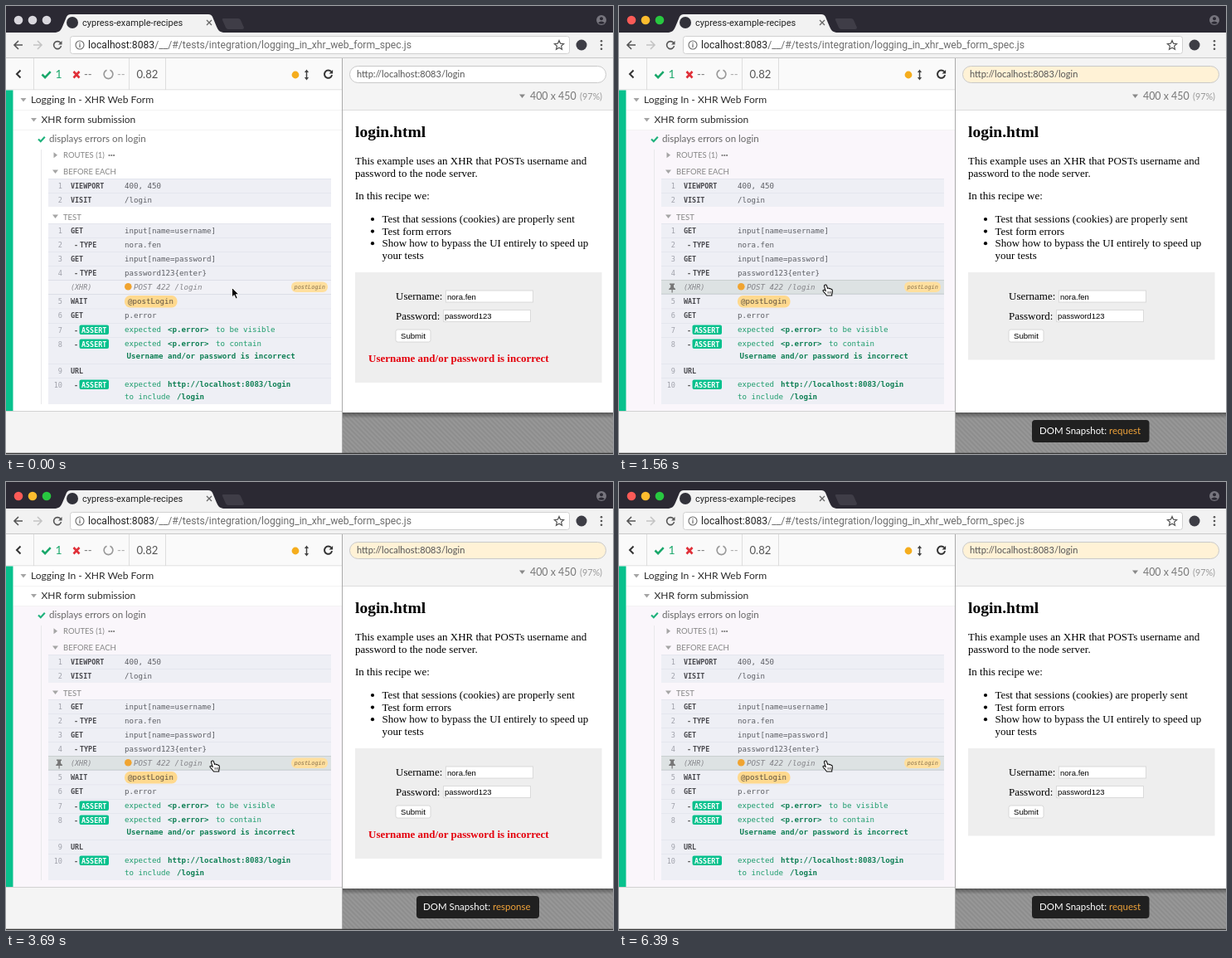
An HTML page that plays this animation: 732x540 px, repeating every 6420 ms.

```html
<!DOCTYPE html>
<html lang="en">
<head>
<meta charset="utf-8">
<title>Test runner</title>
<style>
html, body { margin: 0; width: 100%; height: 100%; overflow: hidden; background: #fff; }
svg { display: block; width: 732px; height: 540px; }
text { white-space: pre; }
.ui { font-family: Lato, sans-serif; }
.chrome { font-family: Roboto, sans-serif; }
.mono { font-family: "DejaVu Sans Mono", monospace; }
.serif { font-family: "Liberation Serif", serif; }
.sans { font-family: "Liberation Sans", sans-serif; }
</style>
</head>
<body>
<svg id="stage" viewBox="0 0 732 540" xmlns="http://www.w3.org/2000/svg"></svg>
<script>
const LOOP = 6420;
const PIN = 1240;        // command gets pinned, first snapshot appears
const SNAPSHOT = 800;    // time each snapshot stays
const FOCUS = 850;       // window becomes active

const esc = s => s.replace(/&/g, '&amp;').replace(/</g, '&lt;');
const text = (cls, x, y, size, fill, s, extra = '') =>
  `<text class="${cls}" x="${x}" y="${y}" font-size="${size}" fill="${fill}" ${extra}>${esc(s)}</text>`;
const rect = (x, y, w, h, fill, extra = '') =>
  `<rect x="${x}" y="${y}" width="${w}" height="${h}" fill="${fill}" ${extra}/>`;
const circle = (x, y, r, fill, extra = '') =>
  `<circle cx="${x}" cy="${y}" r="${r}" fill="${fill}" ${extra}/>`;
const path = (d, fill, extra = '') => `<path d="${d}" fill="${fill}" ${extra}/>`;
const line = (d, color, width = 1, extra = '') =>
  path(d, 'none', `stroke="${color}" stroke-width="${width}" ${extra}`);
const group = (id, body) => `<g id="${id}">${body}</g>`;
const BOLD = 'font-weight="700"', ITALIC = 'font-style="italic"';

const defs = `<defs>
  <pattern id="hatch" width="4" height="4" patternUnits="userSpaceOnUse" patternTransform="rotate(-45)">
    ${rect(0, 0, 4, 4, '#979797')}${rect(0, 0, 2, 4, '#8d8d8d')}
  </pattern>
  <linearGradient id="shade" x2="0" y2="1">
    <stop stop-color="#000" stop-opacity=".4"/><stop offset="1" stop-color="#000" stop-opacity="0"/>
  </linearGradient>
</defs>`;

function browser() {
  const reload = (x, y, r, w, color) =>
    line(`M${x + r * .8} ${y - r * .6}A${r} ${r} 0 1 0 ${x + r} ${y + r * .25}`, color, w) +
    path(`M${x + r + 1} ${y - r - .5}v${r}h${-r}z`, color);
  return rect(0, 0, 732, 32, '#2b2933') +
    path('M60 32C65 31 66 29 68 25L73 13Q74.5 10 78 10H244Q247.5 10 249 13L254 25C256 29 257 31 262 32Z', '#f2f2f2') +
    path('M262 15H280Q282 15 283 17L287 26Q287 28 285 28H268Q266 28 265 26L261 17Q260 15 262 15Z', '#3f3d47') +
    circle(80, 20, 7, '#32323a') +
    text('chrome', 92, 24, 11, '#222', 'cypress-example-recipes') +
    line('M242 17l6 6m0-6l-6 6', '#666', 1.3) +
    circle(718, 17, 6, '#77757e') + circle(718, 15.3, 2, '#2b2933') +
    path('M714 20.5Q718 16.5 722 20.5Q718 23 714 20.5Z', '#2b2933') +
    rect(0, 32, 732, 31, '#f2f2f2') +
    line('M20 47H10m5-5l-5 5l5 5', '#555', 1.6) +
    line('M33 47h10m-5-5l5 5l-5 5', '#c4c4c4', 1.6) +
    reload(62, 47, 4.5, 1.6, '#555') +
    rect(77.5, 36.5, 602, 21, '#fff', 'rx="3" stroke="#d0d0d0"') +
    circle(89, 47, 5, 'none', 'stroke="#666" stroke-width="1.1"') +
    line('M89 46v4m0-6v1.2', '#666', 1.2) +
    `<text class="chrome" x="99" y="51" font-size="12.2" fill="#222">localhost:8083<tspan fill="#6c6c6c">/__/#/tests/integration/logging_in_xhr_web_form_spec.js</tspan></text>` +
    path('M667 41.5l1.6 3.7l4 .4l-3 2.7l.9 4l-3.5-2.1l-3.5 2.1l.9-4l-3-2.7l4-.4z', 'none', 'stroke="#555" stroke-width="1.2"') +
    circle(694, 47, 6.5, '#3d3d45') +
    [42.3, 47, 51.7].map(y => circle(718, y, 1.3, '#555')).join('') +
    rect(0, 62, 732, 1, '#c9c9c9') +
    rect(0, 63, 405, 38, '#fafafa') +
    line('M17.5 77.5l-4.5 4.5l4.5 4.5', '#333', 2) +
    line('M33.5 63v38M148.5 63v38M192.5 63v38', '#dedede') +
    line('M43.5 82.5l3.6 3.6l6.6-7', '#1aa86b', 2.6) +
    text('ui', 59.5, 87, 14, '#1aa86b', '1') +
    line('M81.5 79l7 7.5m0-7.5l-7 7.5', '#e02f38', 2.6) +
    text('ui', 94, 87, 13, '#777', '--') +
    line('M125.5 77.2A5.4 5.4 0 1 1 121.5 77.2', '#999', 1.7) +
    text('ui', 134, 87, 13, '#aaa', '--') +
    text('ui', 157.5, 86.5, 13.1, '#555', '0.82') +
    circle(349, 83, 4.4, '#f5ad1d') +
    line('M362.5 79v8', '#444', 1.5) + path('M362.5 76.5l2.6 3.5h-5.2zM362.5 89.5l2.6-3.5h-5.2z', '#444') +
    reload(388.5, 82, 4.6, 2, '#333') +
    rect(0, 100.5, 405, 1, '#d8d8d8');
}

// Each command: row top, height, number, label, message; indented labels start with "-"
const COMMANDS = [
  [208, 17, '1', 'VIEWPORT', '400, 450'],
  [225, 17, '2', 'VISIT', '/login'],
  [262, 17, '1', 'GET', 'input[name=username]'],
  [279, 17, '2', '-TYPE', 'nora.fen'],
  [296, 17, '3', 'GET', 'input[name=password]'],
  [313, 17, '4', '-TYPE', 'password123{enter}'],
  [330, 17, '', '(XHR)', ''],
  [347, 17.5, '5', 'WAIT', ''],
  [364.5, 17.5, '6', 'GET', 'p.error'],
  [382, 17, '7', '-ASSERT', ''],
  [399, 32, '8', '-ASSERT', ''],
  [431, 17, '9', 'URL', ''],
  [448, 32, '10', '-ASSERT', '']
];

function command([top, height, number, label, message]) {
  const base = top + 11.5;
  const child = label[0] === '-';
  const name = child ? label.slice(1) : label;
  const isXhr = name === '(XHR)';
  let out = rect(51, top, 341, height, '#eeeff5', isXhr ? 'id="xhrRow"' : '') +
    rect(51, top, 341, .8, isXhr || name === 'WAIT' ? '#d9dae4' : '#e3e4ed');
  out += text('mono', 68, base, 8.6, '#a0a2ab', number, 'text-anchor="end"');
  if (child) out += text('mono', 82, base, 8.4, '#555', '-', BOLD);
  if (name === 'ASSERT') {
    out += rect(88.5, top + 2.5, 35.5, 11.5, '#08c18d', 'rx="2"') + text('mono', 91, base, 8.4, '#fff', name, BOLD);
  } else {
    out += text('mono', child ? 89 : 78, base, 8.4, isXhr ? '#85858a' : '#48484d', name, isXhr ? ITALIC : BOLD);
  }
  return out + text('mono', 143, base, 9.15, '#5c5e64', message);
}

function reporter() {
  const mono = (x, y, s, bold) =>
    text('mono', x, y, 9.15, bold ? '#0e7f54' : '#1c9c6c', s, bold ? BOLD : '');
  const down = (x, y) => path(`M${x - 3.5} ${y - 2}h7l-3.5 4.5z`, '#a5a5a5');
  return rect(0, 101.5, 405, 387, '#fff') +
    rect(8, 150, 397, 338, '#faf6fb', 'id="testHover"') +
    rect(0, 101.5, 8.5, 387, '#08c18d') +
    down(21, 113) + text('ui', 30, 117.3, 12.1, '#2b2b2b', 'Logging In - XHR Web Form') +
    line('M9 125.5H405M9 149.5H405', '#f3f3f3') +
    down(33.5, 137) + text('ui', 42.5, 141.3, 12, '#2b2b2b', 'XHR form submission') +
    line('M39 160.5l2.8 2.8l5-5.6', '#1fb27c', 2.1) +
    text('ui', 52, 164.3, 11.6, '#686868', 'displays errors on login') +
    line('M42.5 173V480', '#e8e8ea') +
    path('M57.5 176.2l4.5 3.5l-4.5 3.5z', '#a5a5a5') +
    text('ui', 69, 183.3, 9.5, '#858585', 'ROUTES (1)') +
    [124.5, 127.3, 130.1].map(x => circle(x, 180, 1.1, '#777')).join('') +
    down(59.5, 199.5) + text('ui', 69, 203.3, 9.5, '#858585', 'BEFORE EACH') +
    down(59.5, 253.5) + text('ui', 69, 257.5, 9.5, '#858585', 'TEST') +
    COMMANDS.map(command).join('') +
    circle(147.3, 338.3, 4.3, '#f0a431') +
    text('mono', 154, 341.5, 9.15, '#85858a', 'POST 422 /login', ITALIC) +
    rect(344, 332.5, 44, 12.5, '#ffdf9e', 'rx="6"') +
    text('mono', 347.5, 341.3, 6.9, '#88734d', 'postLogin', ITALIC) +
    rect(143, 349, 63.5, 14.5, '#ffd98e', 'rx="6.5"') +
    text('mono', 147, 359.2, 9.15, '#5c5140', '@postLogin') +
    mono(143, 393.3, 'expected') + mono(195, 393.3, '<p.error>', 1) + mono(253, 393.3, 'to be visible') +
    mono(143, 410.3, 'expected') + mono(195, 410.3, '<p.error>', 1) + mono(253, 410.3, 'to contain') +
    mono(145.5, 424.7, 'Username and/or password is incorrect', 1) +
    mono(143, 459.3, 'expected') + mono(195, 459.3, 'http://localhost:8083/login', 1) +
    mono(143, 473.7, 'to include') + mono(206, 473.7, '/login', 1) +
    group('pin', line('M51 330.5H392M51 347H392', '#c9d0d0') +
      path('M61 334.5h6v1.5h-1v3l2 2v1h-3.3v3.5h-1.2v-3.5h-3.3v-1l2-2v-3h-1.2z', '#777')) +
    rect(0, 488, 405, 52, '#f4f4f4') + rect(0, 488, 405, 1, '#d2d2d2');
}

function preview() {
  const serif = (x, y, s, extra = '', size = 13, fill = '#000') => text('serif', x, y, size, fill, s, extra);
  const field = (x, y, s) =>
    rect(x + .5, y + .5, 105, 14, '#fff', 'stroke="#dadada"') + text('sans', x + 2, y + 11, 9.5, '#000', s);
  const bullets = ['Test that sessions (cookies) are properly sent', 'Test form errors',
    'Show how to bypass the UI entirely to speed up'];
  return rect(405, 63, 327, 63, '#f4f4f4') +
    rect(414.5, 72.5, 309, 20, '#fff', 'id="address" rx="10" stroke="#c9c9c9"') +
    text('ui', 423, 86.3, 11.05, '#555', 'http://localhost:8083/login') +
    path('M619 106.5h7l-3.5 4.5z', '#888') +
    text('ui', 632, 113, 12.4, '#777', '400 x 450') + text('ui', 692, 113, 10.8, '#999', '(97%)') +
    rect(405, 125, 327, 1, '#ddd') +
    rect(406, 126, 326, 364, '#fff') +
    serif(421, 158, 'login.html', BOLD, 19.5) +
    serif(421, 191, 'This example uses an XHR that POSTs username and') +
    serif(421, 205.7, 'password to the node server.') +
    serif(421, 233.2, 'In this recipe we:') +
    bullets.map((s, i) => circle(442, 257 + i * 14.6, 2.1, '#000') + serif(453.5, 261 + i * 14.6, s)).join('') +
    serif(453.5, 304.8, 'your tests') +
    rect(421, 321, 297.5, 133, '#eee', 'id="form"') +
    serif(470, 353.7, 'Username:') + field(530, 342.5, 'nora.fen') +
    serif(470, 377.5, 'Password:') + field(527, 366, 'password123') +
    rect(470, 390, 42, 15, '#fff', 'rx="2.5" stroke="#d0d0d0" stroke-width=".8"') +
    text('sans', 476, 401, 9.6, '#000', 'Submit') +
    group('error', serif(437, 429.3, 'Username and/or password is incorrect', BOLD, 13, '#e4000c')) +
    rect(406, 490, 326, 50, 'url(#hatch)') + rect(406, 490, 326, 7, 'url(#shade)') +
    rect(405, 63, 1, 477, '#aaa') + rect(0, 538.7, 732, 1.3, '#3a3a3a');
}

function bubble(id, x, width, textX, label) {
  return group(id, rect(x, 499, width, 27, '#202020', 'rx="4"') +
    `<text class="ui" x="${textX}" y="516.3" font-size="11.5" fill="#fff">DOM Snapshot: <tspan fill="#f0a33a">${label}</tspan></text>`);
}

const arrow = path('M0 0V11.4L2.7 9L4.7 13.4L6.7 12.5L4.8 8.2H8.3Z', '#000', 'stroke="#fff" stroke-width=".9"');
const hand = path('M248.2 336.2q1.7-.8 2.3 1l1.1 3.2q1.4-.9 2 .3q1.4-.6 1.9.6q1.5-.3 1.7 1.2q.5 3.1-.5 4.7v1.8h-6.2q-1.6-2.6-4.3-5.2q-.6-1.8 1.5-1.6l1.4 1l-1.6-5q-.2-1.4.7-2z',
  '#fff', 'stroke="#111" stroke-width="1.1"') + line('M252 344v2.8m1.8-2.8v2.8m1.8-2.8v2.8', '#222', .7);

document.getElementById('stage').innerHTML = defs + browser() +
  [15, 32, 49].map((x, i) => circle(x, 17, 5.3, '#d9d7dd', `id="light${i}"`)).join('') +
  reporter() + preview() +
  bubble('request', 498, 141.5, 507, 'request') + bubble('response', 495, 148, 503, 'response') +
  group('arrow', arrow) + group('hand', hand);

const el = id => document.getElementById(id);
const show = (id, on) => el(id).setAttribute('visibility', on ? 'visible' : 'hidden');
const fill = (id, color) => el(id).setAttribute('fill', color);
const smooth = (t, from, to) => {
  const p = Math.min(1, Math.max(0, (t - from) / (to - from)));
  return p * p * (3 - 2 * p);
};

function update(t) {
  const pinned = t >= PIN;
  const request = pinned && Math.floor((t - PIN) / SNAPSHOT) % 2 === 0;
  const overLink = t >= PIN - 60;

  ['#fc5b57', '#fdbc2e', '#28c840'].forEach((c, i) => fill('light' + i, t >= FOCUS ? c : '#d9d7dd'));
  fill('address', pinned ? '#fff2d6' : '#fff');
  fill('xhrRow', pinned ? '#dde2e3' : '#f1f1f6');
  show('testHover', pinned);
  show('pin', pinned);
  show('request', request);
  show('response', pinned && !request);
  show('error', !request);
  el('form').setAttribute('height', request ? 105.5 : 133);

  const p = smooth(t, 200, 850);
  el('arrow').setAttribute('transform', `translate(${272.5 - 19 * p} ${339.5 - 5 * p})`);
  show('arrow', !overLink);
  show('hand', overLink);
}

const start = performance.now();
function tick() {
  update((performance.now() - start) % LOOP);
  requestAnimationFrame(tick);
}
tick();
</script>
</body>
</html>
```
